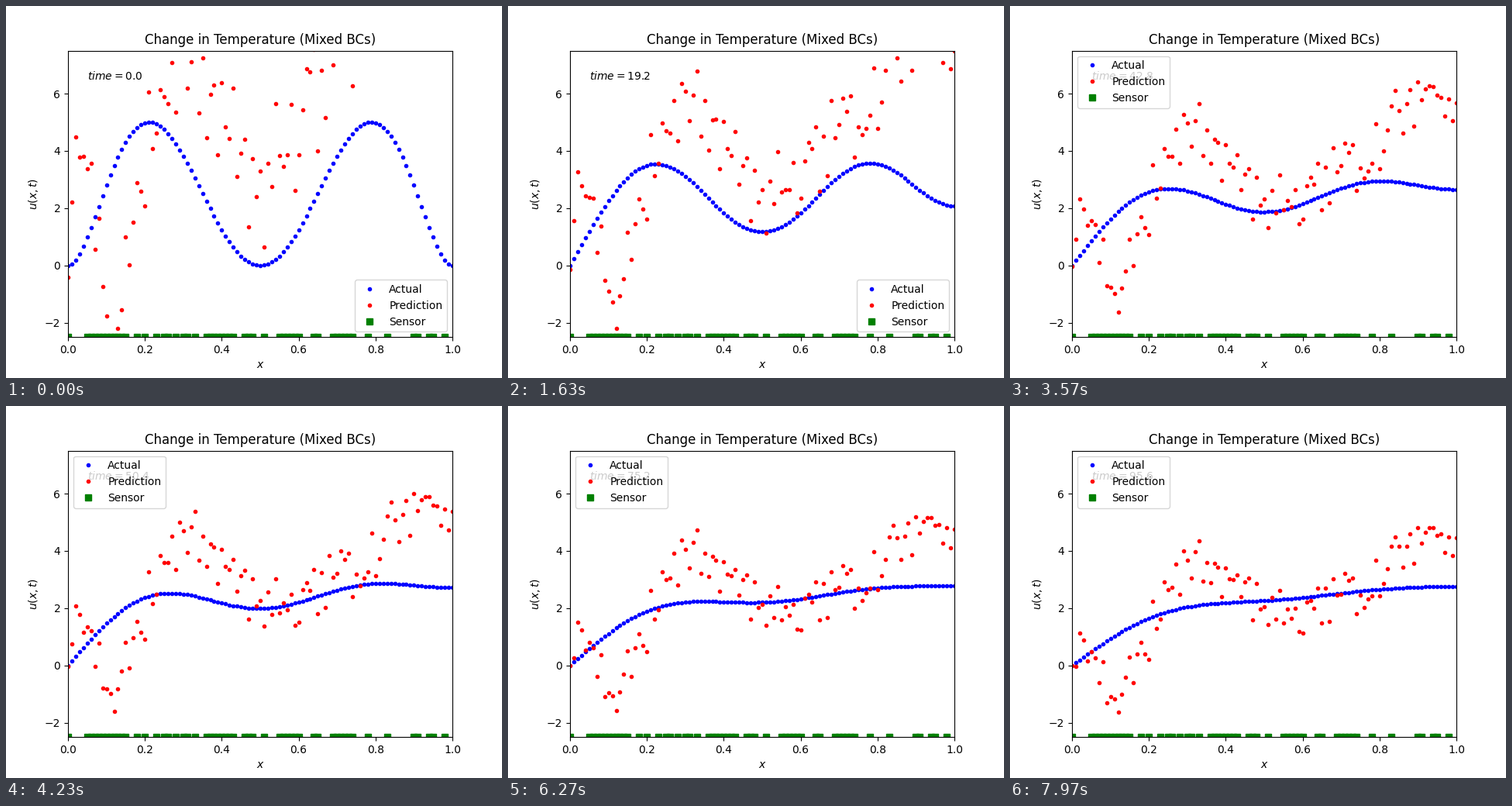
Write a matplotlib script that moves like this. It is 640 px wide and 480 px high and loops after 8 s.

```python
import numpy as np
import matplotlib.pyplot as plt
from matplotlib.animation import FuncAnimation

FRAMES = 240
LOOP_MS = 8000
DT = 0.4
T_END = DT * (FRAMES - 1)
ALPHA = 3e-4
LEGEND_JUMP = 71

x = np.linspace(0, 1, 101)

# Exact solution: u = 0 on the left, u_x = 0 on the right, as a sine series.
k = (np.arange(80) + 0.5) * np.pi
grid = (np.arange(2000) + 0.5) / 2000
profile = 2160 * (grid * (grid - 0.5) * (grid - 1)) ** 2
coef = 2 * np.sin(np.outer(k, grid)) @ profile / grid.size
modes = np.sin(np.outer(x, k)) * coef


def actual(t):
    return modes @ np.exp(-ALPHA * k**2 * t)


# Prediction: a noisy trend that falls by "drop" to its final level "last".
rng = np.random.default_rng(3)
noise_a, noise_b = rng.uniform(-1, 1, (2, x.size))
knots = [0, 0.04, 0.12, 0.2, 0.3, 0.4, 0.5, 0.6, 0.7, 0.8, 0.9, 1]
last = np.interp(x, knots, [0.3, 0.9, -1.5, 1.1, 3.9, 2.8,
                            2.1, 1.7, 2.3, 3.1, 4.5, 4.5]) + 0.9 * noise_a
drop = np.interp(x, knots, [1.5, 4.4, -1.8, 2.2, 4, 2,
                            0.4, 3.2, 5, 6.8, 8.4, 7]) + noise_a + noise_b

# The drop splits into a slow part (stronger on the left) and a fast part.
left = 1 / (1 + np.exp((x - 0.4) / 0.03))
slow = 0.1 + 1.35 * left + (0.25 + 0.13 * left) * drop
fast = drop - slow
last[0] = slow[0] = 0
fast[0] = -0.4


def decay(rate, t):
    end = np.exp(-rate * T_END)
    return (np.exp(-rate * t) - end) / (1 - end)


def predicted(t):
    return last + slow * decay(0.012, t) + fast * decay(0.055, t)


sensors = np.r_[0, 5:16, 18, 20, 23, 25, 26, 28, 30, 31, 33, 36:44, 46:49, 51,
                55:61, 64, 65, 69:75, 78, 83, 90, 91, 94, 95, 98] / 100

fig, ax = plt.subplots(figsize=(6.4, 4.8), dpi=100)
ax.set(xlim=(0, 1), ylim=(-2.5, 7.5), xlabel="$x$", ylabel="$u(x,t)$",
       title="Change in Temperature (Mixed BCs)")
actual_dots, = ax.plot(x, actual(0), "b.", label="Actual")
predicted_dots, = ax.plot(x, predicted(0), "r.", label="Prediction")
ax.plot(sensors, np.full(sensors.size, -2.5), "gs", label="Sensor")
clock = ax.text(0.05, 6.5, "")
legend = ax.legend(loc="lower right")


def update(i):
    t = DT * i
    actual_dots.set_ydata(actual(t))
    predicted_dots.set_ydata(predicted(t))
    clock.set_text(f"$time = {t:.1f}$")
    legend.set_loc("lower right" if i < LEGEND_JUMP else "upper left")
    return actual_dots, predicted_dots, clock, legend


anim = FuncAnimation(fig, update, frames=FRAMES, interval=LOOP_MS / FRAMES,
                     repeat=True, repeat_delay=0, blit=False)
plt.show()
```
